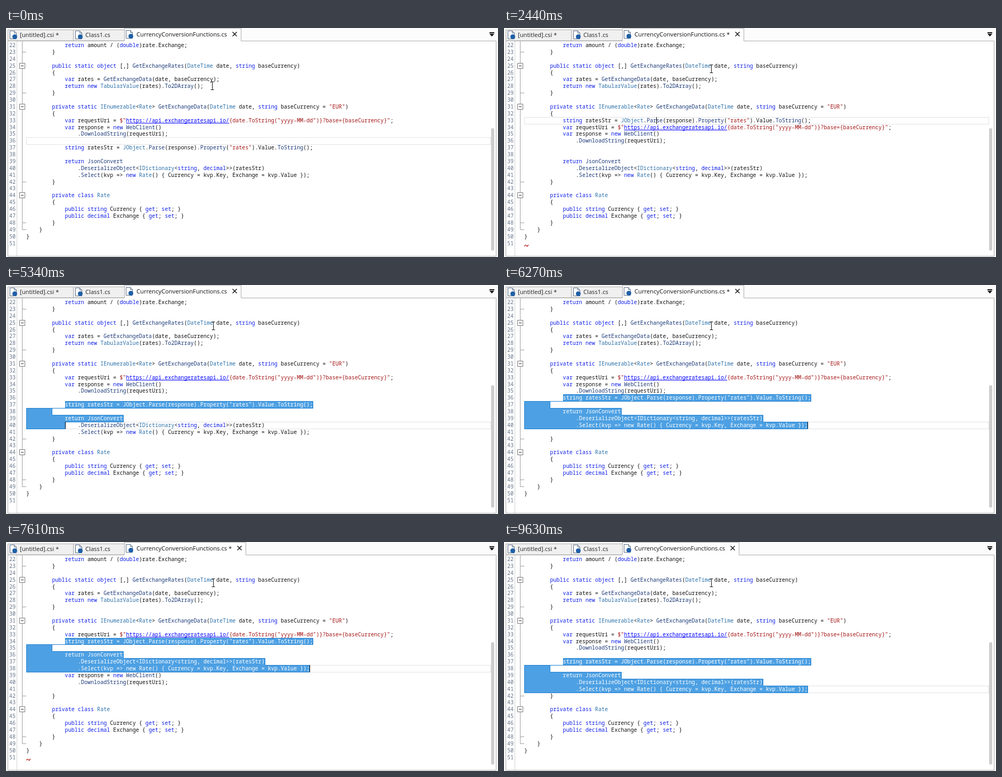
An HTML page with a canvas for the animation above (9860 ms loop, 924x432 px).

```html
<!DOCTYPE html>
<html lang="en">
<head>
<meta charset="utf-8">
<title>Moving lines in a code editor</title>
<style>
html, body { margin: 0; width: 100%; height: 100%; overflow: hidden; background: #fcfcfc; }
canvas { display: block; }
</style>
</head>
<body>
<canvas id="stage" width="924" height="432"></canvas>
<script>
const ctx = document.getElementById('stage').getContext('2d');
const LOOP = 9860, FIRST = 22, LEFT = 38, CHAR = 6.05, PITCH = 12.88;
const CODE_FONT = '10.08px "Noto Sans Mono", monospace';
const BOLD_FONT = '500 ' + CODE_FONT;
const TAB_FONT = '11.2px "Open Sans", sans-serif';

const source = `            return amount / (double)rate.Exchange;
        }

        public static object [,] GetExchangeRates(DateTime date, string baseCurrency)
        {
            var rates = GetExchangeData(date, baseCurrency);
            return new TabularValue(rates).To2DArray();
        }

        private static IEnumerable<Rate> GetExchangeData(DateTime date, string baseCurrency = "EUR")
        {
            var requestUri = $"https://api.exchangeratesapi.io/{date.ToString("yyyy-MM-dd")}?base={baseCurrency}";
            var response = new WebClient()
                .DownloadString(requestUri);

            string ratesStr = JObject.Parse(response).Property("rates").Value.ToString();
${' '.repeat(8)}
            return JsonConvert
                .DeserializeObject<IDictionary<string, decimal>>(ratesStr)
                .Select(kvp => new Rate() { Currency = kvp.Key, Exchange = kvp.Value });
        }

        private class Rate
        {
            public string Currency { get; set; }
            public decimal Exchange { get; set; }
        }
    }
}
`.split('\n');

const KEYWORD = /^(return|double|public|private|static|object|string|var|new|decimal|class|get|set)$/;
const TYPE = /^(DateTime|IEnumerable|IDictionary|Rate|TabularValue|JObject)$/;
const NAVY = /^(GetExchange\w+|To2DArray|WebClient|JsonConvert|DownloadString|Parse|Property|ToString|DeserializeObject|Select)$/;
const TOKEN = /\$"(?=https)|https:.*?\.io\/|\{date.*Currency\}"|"[^"]*"|\w+|[^\s\w"]+/g;

function colorOf(word) {
  if (word.startsWith('https')) return '#0000ff';
  if (word.includes('"')) return '#a31515';
  if (KEYWORD.test(word)) return '#0f1fe8';
  if (TYPE.test(word)) return '#2b70a8';
  if (NAVY.test(word)) return '#1c3a78';
  return '#111';
}

// Key presses: each moves the block one line up or down
const lineUp = [2060, 2190, 2320, 2440, 2520, 2680, 2830, 2990];
const lineDown = [3220, 3360, 3500, 3640, 3780, 3920, 4090, 4240];
const blockUp = [6270, 6420, 6570, 6720, 6890, 7060, 7290];
const blockDown = [7360, 7440, 7530, 7610, 7680, 7760, 7830];

// Caret: time, line, column, selecting
const carets = [
  [0, 36, -1, false], [690, 37, 41, false], [4790, 37, 12, false],
  [4960, 38, 8, true], [5150, 39, 12, true], [5340, 40, 12, true],
  [5570, 41, 12, true], [5800, 41, 88, true]
];
const caretOff = [[1210, 1740], [8930, 9080], [9630, LOOP]];
const squiggleOn = [[2190, 4470], [6420, 8230]];
const pointer = [[0, 387, 109], [210, 387, 109], [640, 289, 227], [760, 289, 227], [1210, 389, 77], [LOOP, 389, 77]];

const count = (times, t) => times.filter(v => v <= t).length;
const during = (spans, t) => spans.some(([a, b]) => t >= a && t < b);
const rowTop = line => Math.round(26 + (line - FIRST) * PITCH);
const rowMid = line => rowTop(line) + 6.5;
const colX = col => Math.round(LEFT + col * CHAR);

function rect(x, y, w, h, fill) {
  ctx.fillStyle = fill;
  ctx.fillRect(x, y, w, h);
}
function path(points, stroke, fill, width = 1) {
  ctx.beginPath();
  points.forEach(([x, y]) => ctx.lineTo(x, y));
  if (fill) { ctx.closePath(); ctx.fillStyle = fill; ctx.fill(); }
  if (stroke) { ctx.strokeStyle = stroke; ctx.lineWidth = width; ctx.stroke(); }
}
function text(s, x, y, color, font) {
  ctx.font = font;
  ctx.fillStyle = color;
  ctx.fillText(s, x, y);
}

function pageIcon(x, y) {
  path([[x, y], [x + 8, y], [x + 12, y + 4], [x + 12, y + 15], [x, y + 15]], '#5d6f86', '#fff');
  path([[x + 8, y], [x + 8, y + 4], [x + 12, y + 4]], '#5d6f86');
  ctx.beginPath();
  ctx.arc(x + 9, y + 11, 4.5, 0, 7);
  ctx.fillStyle = '#1f5fa6';
  ctx.fill();
}

function tabs(modified) {
  const end = modified ? 450.5 : 441.5, cx = end - 12;
  const edge = '#acacac';
  path([[3.5, 24], [3.5, 3.5], [126.5, 3.5], [126.5, 24]], edge, '#f0f0f0');
  path([[126.5, 24], [126.5, 3.5], [222.5, 3.5], [222.5, 24]], edge, '#f0f0f0');
  path([[3.5, 430.5], [3.5, 24.5], [920.5, 24.5], [920.5, 430.5], [3.5, 430.5]], edge, '#fff');
  rect(222, 0, end - 222, 26, '#fff');
  path([[222.5, 24.5], [222.5, .5], [end, .5], [end, 24.5]], edge);
  pageIcon(7.5, 5.5);
  pageIcon(130.5, 5.5);
  pageIcon(225.5, 4.5);
  text('[untitled].csi *', 26, 17, '#222', TAB_FONT);
  text('Class1.cs', 149, 17, '#222', TAB_FONT);
  text('CurrencyConversionFunctions.cs' + (modified ? ' *' : ''), 245, 16, '#111', TAB_FONT);
  path([[cx - 4, 7.5], [cx + 4, 15.5]], '#111', null, 1.5);
  path([[cx + 4, 7.5], [cx - 4, 15.5]], '#111', null, 1.5);
  rect(908, 8, 9, 2, '#111');
  path([[908, 11], [917, 11], [912.5, 16]], null, '#111');
}

// While the code does not parse, the outer class has no fold of its own after line 42
function margins(lines, broken) {
  const gray = '#a0a0a0';
  ctx.setLineDash([1, 1]);
  path([[20.5, 25], [20.5, 430]], '#a8a8a8');
  ctx.setLineDash([]);
  const spans = broken ? [[25, rowMid(42)], [rowMid(44), rowMid(48)]] : [[25, rowMid(49)]];
  spans.forEach(([a, b]) => path([[30.5, a], [30.5, b]], gray));
  lines.forEach((s, i) => {
    const line = FIRST + i, y = Math.floor(rowMid(line)) + .5;
    text(line, 6, rowTop(line) + 10, '#66758a', CODE_FONT);
    if (/^ +}$/.test(s) && !(broken && line === 49)) path([[30.5, y], [38, y]], gray);
  });
  lines.forEach((s, i) => {
    if (s.trim() !== '{') return;
    const y = Math.floor(rowMid(FIRST + i - 1)) + .5;
    path([[25.5, y - 5], [35.5, y - 5], [35.5, y + 5], [25.5, y + 5], [25.5, y - 5]], '#777', '#fff');
    path([[28, y], [33, y]], '#333');
  });
}

// Outline of the selected rows: down the right side, up the left side
function selection(lines, from, to, col) {
  const right = [], left = [];
  for (let line = from; line <= to; line++) {
    const a = rowTop(line) + .5, b = rowTop(line + 1) + .5;
    const x1 = colX(line === from ? 12 : 0) + .5;
    const x2 = colX(line === to ? col : lines[line - FIRST].length) + .5;
    right.push([x2, a], [x2, b]);
    left.unshift([x1, b], [x1, a]);
  }
  const points = [...right, ...left];
  path([...points, points[0]], '#1f7fd0', '#4da0e3');
}

function codeLine(s, line, selected) {
  const y = rowTop(line) + 10;
  for (const m of s.matchAll(TOKEN)) {
    const x = LEFT + m.index * CHAR, word = m[0];
    const picked = m.index < selected;
    text(word, x, y, picked ? '#fff' : colorOf(word), picked ? BOLD_FONT : CODE_FONT);
    if (word.startsWith('https')) rect(x, y + 1, word.length * CHAR, 1, '#0000ff');
  }
}

function ibeam(t) {
  const i = pointer.findIndex(p => p[0] > t);
  const [t0, x0, y0] = pointer[i - 1], [t1, x1, y1] = pointer[i];
  const p = (t - t0) / (t1 - t0), e = p * p * (3 - 2 * p);
  const x = Math.round(x0 + (x1 - x0) * e) + .5, y = Math.round(y0 + (y1 - y0) * e);
  path([[x, y - 8], [x, y + 8]], '#111');
  for (const d of [-7.5, 7.5]) {
    path([[x - 3, y + d], [x - .5, y + d]], '#111');
    path([[x + .5, y + d], [x + 3, y + d]], '#111');
  }
}

function draw(t) {
  const one = count(lineUp, t) - count(lineDown, t);
  const many = count(blockUp, t) - count(blockDown, t);
  const shift = one + many;
  const [, base, col, selecting] = carets[count(carets.map(c => c[0]), t) - 1];
  const caretLine = base - shift, start = 37 - shift;

  const lines = source.slice();
  const block = lines.splice(37 - FIRST, many ? 5 : 1);
  lines.splice(start - FIRST, 0, ...block);

  rect(0, 0, 924, 432, '#fcfcfc');
  tabs(shift > 0);
  ctx.strokeStyle = '#e2e2e6';
  ctx.lineWidth = 1;
  ctx.strokeRect(38.5, rowTop(caretLine) + .5, 872, rowTop(caretLine + 1) - rowTop(caretLine));
  margins(lines, start === 32 || many > 0 && start < 32);
  if (selecting) selection(lines, start, caretLine, col);

  lines.forEach((s, i) => {
    const line = FIRST + i;
    const inside = selecting && line >= start && line <= caretLine;
    codeLine(s, line, !inside ? 0 : line === caretLine ? col : Infinity);
  });

  if (during(squiggleOn, t))
    path([[38, 412], [40, 409.5], [42, 410.5], [43.5, 412], [46, 409]], '#c01818', null, 1.2);
  if (col >= 0 && !during(caretOff, t))
    rect(colX(col), rowTop(caretLine), 1, 13, '#000');

  ctx.beginPath();
  ctx.roundRect(911, 189, 6, 231, 3);
  ctx.fillStyle = '#cdcdcd';
  ctx.fill();
  ibeam(t);
}

function frame() {
  draw(performance.now() % LOOP);
  requestAnimationFrame(frame);
}
frame();
</script>
</body>
</html>
```
